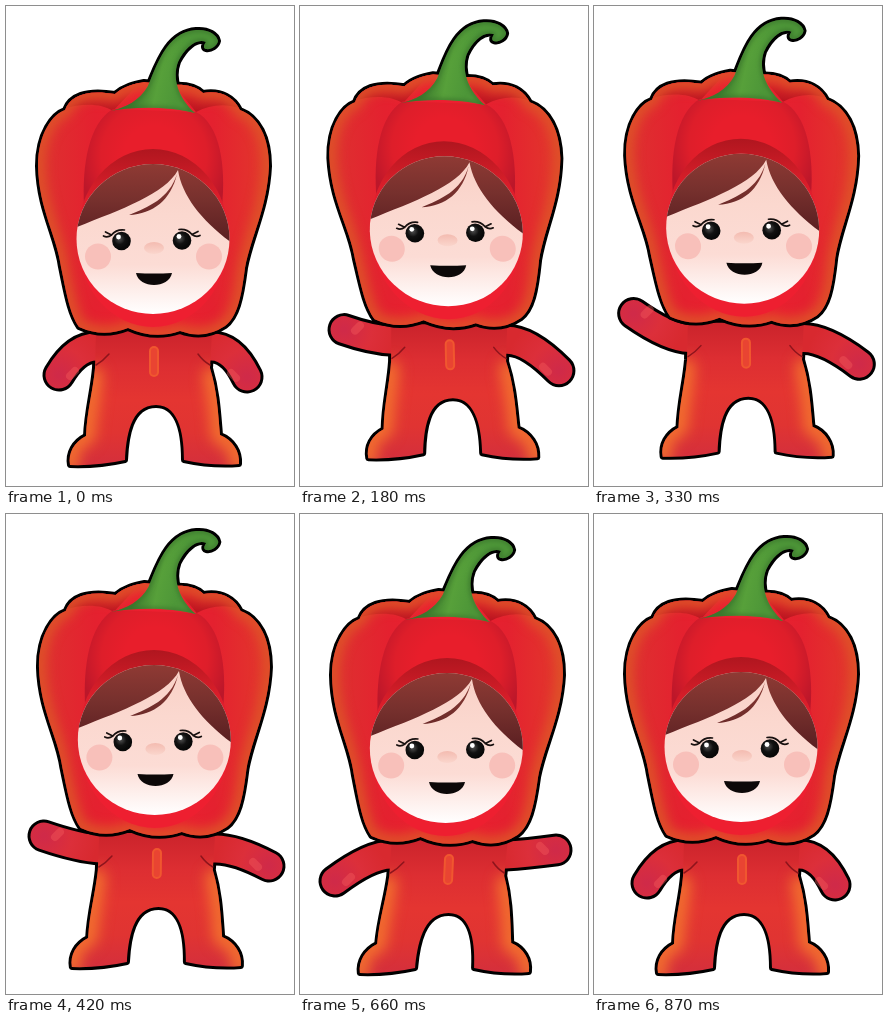
Write an HTML page with a canvas that moves like this. It is 288 by 480 pixels and loops after 900 ms.

```html
<!DOCTYPE html>
<html lang="en">
<head>
<meta charset="utf-8">
<title>Waving pepper</title>
<style>
html, body { margin: 0; width: 288px; height: 480px; overflow: hidden; background: #fff; }
canvas { display: block; }
</style>
</head>
<body>
<canvas id="stage" width="288" height="480"></canvas>
<script>
const ctx = document.getElementById('stage').getContext('2d');
const LOOP = 900, STEP = 30;

// time, head x y lean, body x y lean, left hand x y, right hand x y
const KEYS = [
  [0,    0,    0,   0,     0,   0,  0,     53, 369, 241, 371],
  [90,  -1.5, -3,   .015, -.5, -3,  .02,   48, 350, 250, 367],
  [270,  2.5, -11,  .029,  4,  -9,  .015,  41, 305, 265, 362],
  [420,  1.5, -7,   .005,  3,  -6, -.01,   38, 322, 263, 352],
  [540,  0,   -1.5, 0,     2,  -3, -.035,  35, 347, 259, 347],
  [660, -1,    1,  -.009,  1,   0, -.045,  35, 367, 256, 336],
  [870,  0,    0,   0,     0,   0,  0,     53, 369, 241, 371]
];

const shape = d => new Path2D(d);
const HOOD = shape(`M73 321 C64 308 61 290 55 261 C51 230 33 204 32 160 C32 127 47 108 59 104
  C64 90 80 83 109 88 C118 80 128 78 138 76 L166 79 C178 78 190 80 197 87 C216 84 228 92 234 104
  C253 111 263 132 263 160 C261 203 245 230 239 262 C235 293 231 311 219 320
  Q198 334 174 325 Q148 334 122 322 Q97 332 73 321Z`);
const BACK_LOBES = shape(`M57 103 C75 97 95 97 107 105 L140 70 L60 70Z
  M236 103 C220 97 205 98 190 106 L160 70 L236 70Z`);
const FRONT_LOBE = shape('M107 103 C82 118 76 160 78 200 L216 200 C220 160 214 118 190 106Z');
const STEM = shape(`M104 105 C120 102 134 94 142 80 C150 62 160 26 190 24 C203 23 211 29 212 35
  C211 40 205 44 200 43 C196 42 199 37 200 36 C190 32 179 42 172 56 C166 72 172 92 189 107
  C165 101 130 100 104 105Z`);
const BODY = shape(`M90 325 L206 325 L204 362 C211 385 212 405 214 429 C227 434 234 446 233 458
  Q205 460 178 454 C178 434 175 399 150 399 C124 399 120 432 119 454 Q92 460 64 459
  C62 447 68 436 80 430 C81 405 87 385 89 362Z`);
const LEG_EDGES = shape(`M88 370 C85 390 82 408 80 430 C66 436 62 446 64 459
  M206 370 C213 400 213 415 214 429 C228 436 234 446 233 459`);
const CREASES = shape('M90 359 Q97 355 103 348 M204 359 Q197 355 192 348');
const ZIPPER = shape('M148 345 L148 366');
const HAIR = shape(`M172 164 C159 188 116 203 71 221 L60 150 L172 150Z
  M171 168 C163 193 142 201 123 209 C147 208 165 194 171 168Z
  M172 164 C176 190 196 215 226 237 L235 150 L172 150Z`);
const MOUTH = shape('M130 267 Q148 268 166 267 C163 283 133 283 130 267Z');
const ellipse = (x, y, rx, ry = rx) => {
  const p = new Path2D();
  p.ellipse(x, y, rx, ry, 0, 0, 2 * Math.PI);
  return p;
};
const FACE = ellipse(147, 233, 76.5, 75);

function addStops(g, colors) {
  colors.forEach((c, i) => g.addColorStop(i / (colors.length - 1), c));
  return g;
}
const linear = (x0, y0, x1, y1, ...colors) => addStops(ctx.createLinearGradient(x0, y0, x1, y1), colors);
const radial = (x, y, r0, r1, ...colors) => addStops(ctx.createRadialGradient(x, y, r0, x, y, r1), colors);

function fill(path, style) {
  ctx.fillStyle = style;
  ctx.fill(path);
}
function line(path, style, width) {
  ctx.strokeStyle = style;
  ctx.lineWidth = width;
  ctx.stroke(path);
}
function clipped(path, draw) {
  ctx.save();
  ctx.clip(path);
  draw();
  ctx.restore();
}
function innerGlow(path, color, width, blur, edge = path) {
  clipped(path, () => {
    ctx.filter = `blur(${blur}px)`;
    line(edge, color, width);
  });
}
// Shifts and leans everything drawn, with the lean pivoting at height pivotY
function posed(x, y, lean, pivotY, draw) {
  ctx.save();
  ctx.transform(1, 0, lean, 1, x - lean * pivotY, y);
  draw();
  ctx.restore();
}

// Smooth curve through the key poses; slopes are weighted by the time between keys
function poseAt(t) {
  const n = KEYS.length;
  const key = i => {
    const k = KEYS[(i + n) % n];
    return [k[0] + Math.floor(i / n) * LOOP, ...k.slice(1)];
  };
  const slope = (p, q, r, j) => {
    const before = q[0] - p[0], after = r[0] - q[0];
    return ((q[j] - p[j]) / before * after + (r[j] - q[j]) / after * before) / (before + after);
  };
  let i = n - 1;
  while (KEYS[i][0] > t) i--;
  const [a, b, c, d] = [key(i - 1), key(i), key(i + 1), key(i + 2)];
  const span = c[0] - b[0], u = (t - b[0]) / span;
  return b.map((v, j) => {
    const m0 = slope(a, b, c, j) * span, m1 = slope(b, c, d, j) * span, diff = c[j] - v;
    return v + u * (m0 + u * (3 * diff - 2 * m0 - m1 + u * (m0 + m1 - 2 * diff)));
  }).slice(1);
}

function drawEye(x, y, side) {
  const lash = new Path2D();
  lash.moveTo(x + side * 18, y - 5);
  lash.quadraticCurveTo(x + side * 14, y - 3, x + side * 10, y - 6);
  lash.quadraticCurveTo(x + side * 5, y - 12, x - side * 3, y - 11);
  lash.moveTo(x + side * 16, y - 9);
  lash.lineTo(x + side * 10, y - 6);
  line(lash, '#17100f', 1.7);
  fill(ellipse(x, y, 9.3), radial(x - 2, y - 2, 1, 10, '#444', '#111', '#080808'));
  fill(ellipse(x - 3, y - 4, 2.4), '#fff');
}

function drawFace() {
  fill(FACE, linear(0, 160, 0, 308, '#f9d0c6', '#fbd8cf', '#fcdcd5', '#fff'));
  clipped(FACE, () => fill(HAIR, linear(0, 158, 0, 232, '#8f3a34', '#76302d', '#5c2022')));
  for (const x of [92, 203]) fill(ellipse(x, 250.5, 13), '#f8c0ba');
  fill(ellipse(148, 242, 10, 6), linear(0, 235, 0, 249, '#f3b9ae', '#fbd8cf'));
  drawEye(115.5, 235, -1);
  drawEye(176, 234.5, 1);
  fill(MOUTH, '#0c0808');
}

function drawHead() {
  line(STEM, '#000', 6);
  line(HOOD, '#000', 6);
  fill(HOOD, linear(29, 0, 266, 0, '#dd3330', '#e4212f', '#ee1f30', '#e4212f', '#e23a2c'));
  clipped(HOOD, () => fill(BACK_LOBES, linear(0, 80, 0, 106, '#e8262b', '#b91520')));
  innerGlow(HOOD, '#de5428', 13, 6);
  clipped(HOOD, () => {
    fill(FRONT_LOBE, radial(148, 150, 30, 76, '#e81e2b', '#de1e2a', '#bc172a'));
    fill(ellipse(147, 232, 76, 89), linear(0, 143, 0, 215, '#b0161f', '#d21d28', '#ee1f30'));
  });
  fill(STEM, linear(135, 60, 176, 70, '#3d7c2e', '#57a03a', '#4d9638'));
  innerGlow(STEM, '#3a752c', 3, 2);
  drawFace();
}

function makeArm(shoulderX, elbowX, handX, handY, dx, dy) {
  const p = new Path2D();
  p.moveTo(shoulderX + dx, 341 + dy);
  p.quadraticCurveTo(elbowX + dx, 340 + dy, handX, handY);
  return { path: p, handX, handY, side: Math.sign(elbowX - shoulderX) };
}

function drawArm({ path, handX, handY, side }) {
  line(path, radial(handX, handY, 2, 54, '#d02a48', '#dc2f3a', '#d8292f'), 27);
  const thumb = new Path2D();
  thumb.moveTo(handX - side * 11, handY + 1);
  thumb.lineTo(handX - side * 16, handY - 4);
  line(thumb, 'rgba(246, 92, 92, .4)', 8);
}

function drawBody() {
  fill(BODY, linear(0, 328, 0, 460, '#cc242c', '#dd2e32', '#e43531', '#e03432', '#d42f3c'));
  innerGlow(BODY, '#f2702f', 18, 7, LEG_EDGES);
  line(CREASES, '#8e141c', 1.5);
  line(ZIPPER, '#f0572f', 10);
  line(ZIPPER, '#e94432', 6);
}

function draw(t) {
  const [hx, hy, hLean, bx, by, bLean, lx, ly, rx, ry] = poseAt(t);
  const arms = [makeArm(92, 70, lx, ly, bx, by), makeArm(204, 226, rx, ry, bx, by)];
  const withBody = f => posed(bx, by, bLean, 345, f);
  ctx.fillStyle = '#fff';
  ctx.fillRect(0, 0, 288, 480);
  ctx.lineCap = ctx.lineJoin = 'round';
  arms.forEach(arm => line(arm.path, '#000', 33));
  withBody(() => line(BODY, '#000', 6));
  arms.forEach(drawArm);
  withBody(drawBody);
  posed(hx, hy, hLean, 270, drawHead);
}

function tick() {
  draw(Math.floor(performance.now() % LOOP / STEP) * STEP);
  requestAnimationFrame(tick);
}
tick();
</script>
</body>
</html>
```
